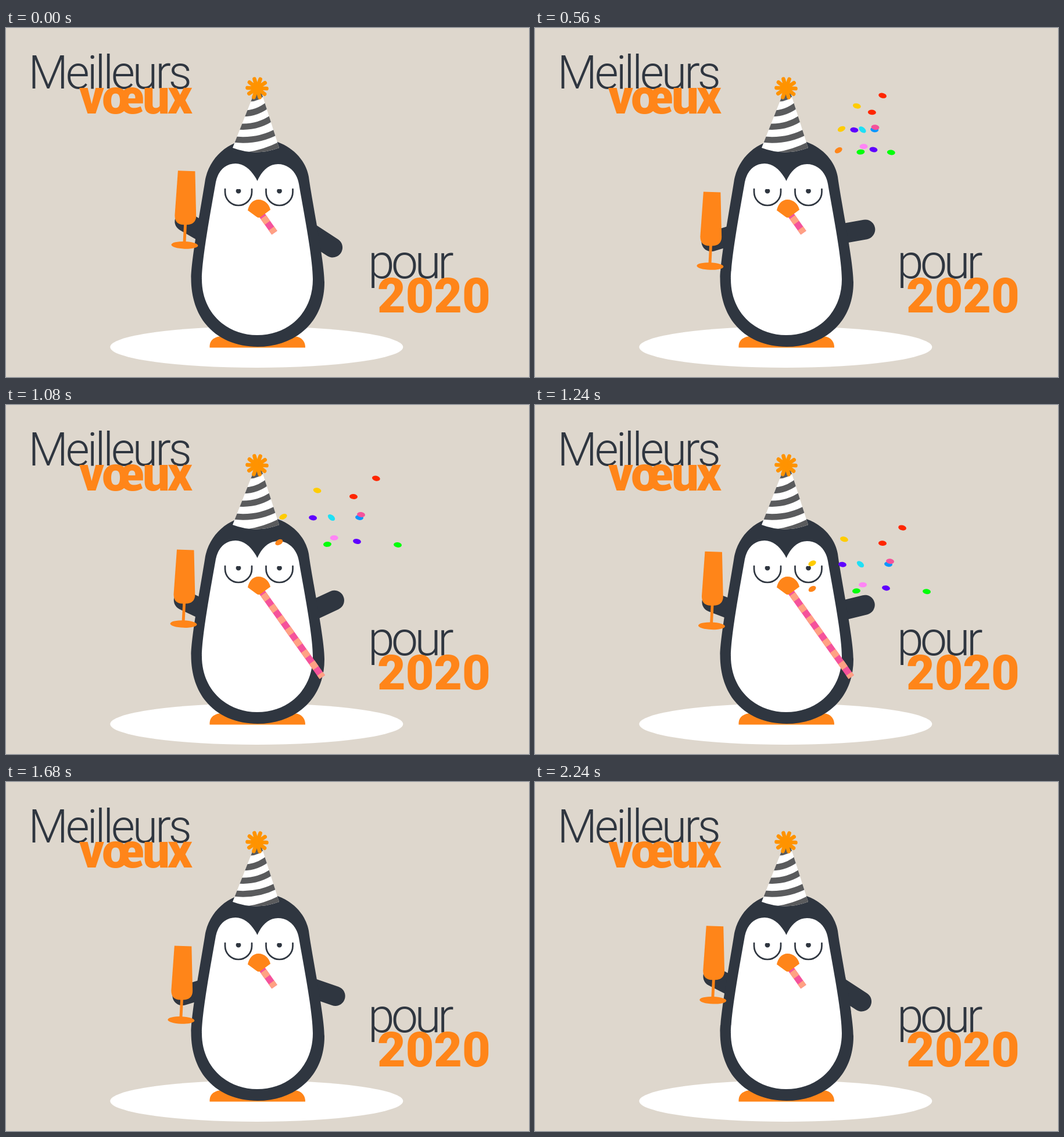
An HTML page for the animation above (2.28 s loop, 900 px wide and 600 px high).

```html
<!DOCTYPE html>
<html lang="fr">
<head>
<meta charset="utf-8">
<title>Meilleurs vœux</title>
<style>
  html, body { margin: 0; width: 100%; height: 100%; overflow: hidden; background: #ded7cd; }
  svg { display: block; width: 900px; height: 600px; }
  .dark { fill: #2f3640; }
  .orange { fill: #ff8519; }
  .arm { stroke: #2f3640; stroke-width: 34; stroke-linecap: round; }
  .eye { fill: none; stroke: #2f3640; stroke-width: 2.7; stroke-linecap: round; }
  text { font-family: Roboto, "Open Sans", sans-serif; }
  .thin { font-weight: 300; fill: #2f3640; }
  .bold { font-weight: 900; fill: #ff8519; }
</style>
</head>
<body>
<svg viewBox="0 0 900 600">
  <defs>
    <clipPath id="cone"><path d="M390 206 L427 112 H440 L470 206 Q430 221 390 206Z"/></clipPath>
    <g id="look">
      <path class="eye" d="M-23 -5 V0 A23 23 0 0 0 23 0 V-5"/>
      <path class="dark" d="M-3 -5 H3 A4.4 4.4 0 1 1 -3 -5Z"/>
    </g>
  </defs>
  <rect width="900" height="600" fill="#ded7cd"/>
  <ellipse cx="431.3" cy="548.5" rx="252" ry="35.5" fill="#fff"/>

  <text class="thin" x="38.5" y="104" font-size="79" letter-spacing="-4">Meilleurs</text>
  <text class="bold" x="126" y="147" font-size="83" letter-spacing="-4">vœux</text>
  <text class="thin" x="623" y="429.5" font-size="82" letter-spacing="-5.5">pour</text>
  <text class="bold" x="639" y="488.5" font-size="84">2020</text>

  <path class="orange" d="M350.5 549.5 V546 C351 536 360 530 372 530 H494 C508 530 515 538 515 549.5Z"/>
  <line id="armL" class="arm" x1="345.5" y1="354.5"/>
  <line id="armR" class="arm" x1="526" y1="354"/>
  <path class="dark" d="M432 190 C478 190 514 218 521 256 C526 295 548 400 548 437 C548 510 493 548 433 548
    C370 548 318.5 508 318.5 430 C319 396 336 305 343 260 C352 218 388 190 432 190Z"/>
  <path fill="#fff" d="M432.5 263 C424 246 411 233 395 233 C378 233 365 245 361 265 C355 300 337 395 337 432
    C337 490 380 528 432 528 C488 528 528 488 528 432 C528 395 512 315 504 268
    C500 246 485 234 468 234 C452 234 440 246 432.5 263Z"/>
  <use href="#look" x="400" y="282"/>
  <use href="#look" x="470.5" y="282"/>

  <g clip-path="url(#cone)">
    <rect x="385" y="105" width="90" height="115" fill="#fff"/>
    <path fill="none" stroke="#5a5b5d" stroke-width="10.5" d="M416 121 Q432 123 446 108 M405 147 Q432 148 453 130
      M396 169 Q432 173 460 153 M388 191 Q432 197 468 177 M414 219 Q446 214 475 199"/>
  </g>
  <g id="pompom" stroke="#ff9300" stroke-width="6.6" stroke-linecap="round" transform="translate(432 103.5)">
    <circle r="10" fill="#ff9300" stroke="none"/>
  </g>

  <g stroke-width="11.5">
    <line id="horn" x1="440" y1="321" stroke="#f5529b"/>
    <line id="bands" x1="440" y1="321" stroke="#ffa184" stroke-dasharray="12 12" stroke-dashoffset="-5"/>
  </g>
  <path class="orange" d="M416 313.5 C418 303 425 295 434.5 295 C445 295 453 303 455 312.5 L438.5 324.5 Q435 327.5 431 324.5Z"/>

  <g id="glass" class="orange">
    <path d="M-12.5 -87 L17 -86 L18.8 -9 C18.8 1 12 6 3 6 H-3 C-12 6 -18 1 -18 -10Z"/>
    <path d="M-2.2 4 H2.6 L1 39 H-4Z"/>
    <ellipse cx="-1" cy="41" rx="23" ry="6.3" transform="rotate(2 -1 41)"/>
  </g>
  <g id="confetti"></g>
</svg>
<script>
const LOOP = 2280, STEP = 40, SWING = 570;
const $ = id => document.getElementById(id);
const set = (el, attrs) => { for (const k in attrs) el.setAttribute(k, attrs[k]); };
const add = (parent, tag, attrs) => {
  const el = document.createElementNS('http://www.w3.org/2000/svg', tag);
  set(el, attrs);
  return parent.appendChild(el);
};
const clamp = v => Math.min(1, Math.max(0, v));
const polar = (x, y, r, deg) => {
  const a = deg * Math.PI / 180;
  return [x + r * Math.cos(a), y + r * Math.sin(a)];
};

// Cubic easing curve solved by bisection
function ease(p, x1, y1, x2, y2) {
  const at = (s, a, b) => 3 * (1 - s) ** 2 * s * a + 3 * (1 - s) * s * s * b + s ** 3;
  let lo = 0, hi = 1;
  for (let i = 0; i < 24; i++) {
    const mid = (lo + hi) / 2;
    if (at(mid, x1, x2) < p) lo = mid; else hi = mid;
  }
  return at(lo, y1, y2);
}

function track(keys, t) {
  let i = 1;
  while (i < keys.length - 1 && keys[i][0] < t) i++;
  const [t0, v0] = keys[i - 1], [t1, v1] = keys[i];
  return v0 + (v1 - v0) * clamp((t - t0) / (t1 - t0));
}

for (let i = 0; i < 10; i++) {
  const [x2, y2] = polar(0, 0, 16.5, -70 + i * 36);
  add($('pompom'), 'line', { x2, y2 });
}

// Peak x, peak y, sideways drift, tilt, colour
const pieces = [
  [538, 91.5, -13, 14, '#ffcc00'],
  [477, 139, 0, -25, '#ffcc00'],
  [465, 183, 26, -30, '#ff8519'],
  [527.5, 141, 3, 8, '#5f00ff'],
  [560, 140.5, 0, 38, '#1fe0f5'],
  [553, 186.5, 0, -5, '#00ff0a'],
  [565, 175, -2, 0, '#ff85f5'],
  [604, 181.5, 0, 10, '#5f00ff'],
  [608, 140.5, 0, 8, '#0a96ff'],
  [611, 135.5, 0, 8, '#f5529b'],
  [598, 104.5, 0, 4, '#ff2600'],
  [640, 70, -17, 14, '#ff2600'],
  [674, 187.5, 0, 8, '#00ff0a']
].map(([x, y, drift, tilt, fill]) => ({
  x, y, drift, tilt, el: add($('confetti'), 'ellipse', { rx: 7, ry: 4.4, fill })
}));

const armKeys = [[420, 33], [660, -41], [800, -39], [1080, -25], [1440, 0], [1680, 19], [1880, 33]];
const hornKeys = [[840, 38], [1040, 180], [1480, 180], [1660, 38]];
const THROW = 440, PEAK = 800, HAND = [566, 345];

function drawGlass(t) {
  const phase = t % (2 * SWING);
  const p = ease((phase < SWING ? phase : 2 * SWING - phase) / SWING, .3, .2, .45, 1);
  const angle = 30 - 47 * p;
  const [x2, y2] = polar(345.5, 354.5, 44, 180 + angle);
  set($('armL'), { x2, y2 });
  set($('glass'), { transform: `translate(${polar(347, 357.4, 46, 183 + angle)})` });
}

function drawConfetti(t) {
  const shown = t > THROW && t < 1680;
  $('confetti').style.display = shown ? '' : 'none';
  if (!shown) return;
  const left = 1 - clamp((t - THROW) / (PEAK - THROW));
  const sx = left ** 1.4, sy = left ** 4.4;
  const fall = (Math.max(0, t - PEAK) / 640) ** 2.04;
  for (const { x, y, drift, tilt, el } of pieces) {
    const px = x + (HAND[0] - x) * sx + drift * fall;
    const py = y + (HAND[1] - y) * sy + (286 + Math.max(0, -drift)) * fall;
    set(el, { transform: `translate(${px} ${py}) rotate(${tilt})` });
  }
}

function draw(t) {
  drawGlass(t);
  const [x2, y2] = polar(526, 354, 43, track(armKeys, t));
  set($('armR'), { x2, y2 });
  const [hx, hy] = polar(440, 321, track(hornKeys, t), 54.6);
  for (const id of ['horn', 'bands']) set($(id), { x2: hx, y2: hy });
  drawConfetti(t);
}

const start = performance.now();
function tick() {
  const t = (performance.now() - start) % LOOP;
  draw(Math.floor(t / STEP) * STEP);
  requestAnimationFrame(tick);
}
tick();
</script>
</body>
</html>
```
